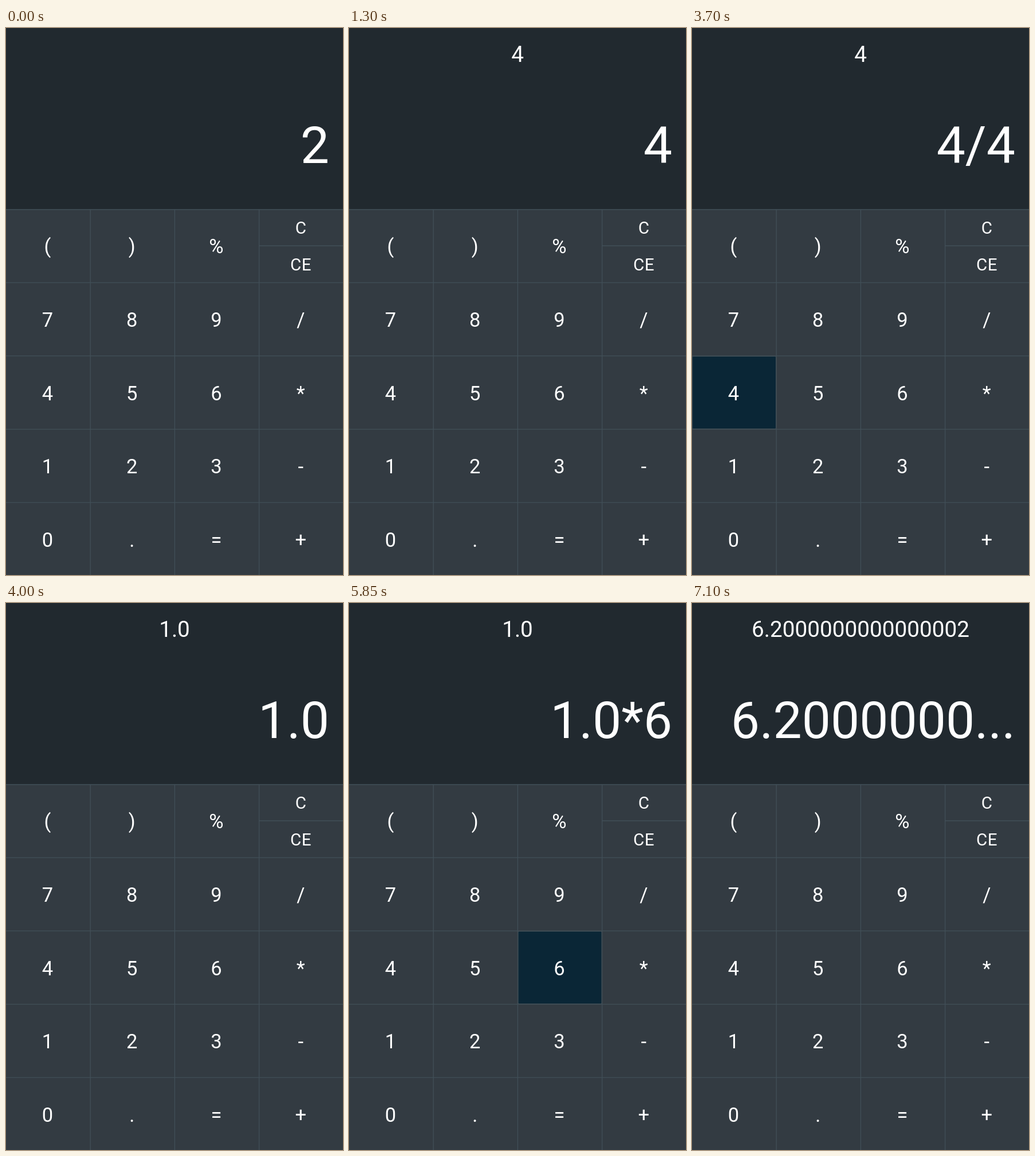
Write an HTML page that moves like this. It is 588 px wide and 952 px high and loops after 8 s.

```html
<!DOCTYPE html>
<html lang="en">
<head>
<meta charset="utf-8">
<title>Calculator</title>
<style>
  html, body { margin: 0; width: 100%; height: 100%; overflow: hidden; background: #21292f; }
  svg { display: block; width: 588px; height: 952px; }
  text { fill: #fff; font-family: Roboto, Arial, sans-serif; font-kerning: none; }
  .key { font-size: 34.5px; text-anchor: middle; }
  .small { font-size: 29.5px; letter-spacing: .5px; }
  #entry { font-size: 89.4px; text-anchor: end; }
  #result { font-size: 38.7px; text-anchor: middle; }
  #lines { stroke: #43525a; stroke-width: 1.3; fill: none; }
  #press { fill: #0a2636; stroke: #3d4a52; stroke-width: 1; }
</style>
</head>
<body>
<svg viewBox="0 0 588 952">
  <rect width="588" height="952" fill="#21292f"/>
  <rect y="315.5" width="588" height="636.5" fill="#333b42"/>
  <path id="lines" d="M0 316H588" stroke-opacity=".9"/>
  <rect id="press" rx="2"/>
  <g id="keys"></g>
  <text id="result" x="294" y="59"></text>
  <text id="entry" x="564" y="235"></text>
</svg>
<script>
const LOOP = 8000, COL = 147.2, ROW = 127.6, TOP = 315.5;
const $ = id => document.getElementById(id);
const rows = ["()%", "789/", "456*", "123-", "0.=+"];

// Each press: start, end, key, entry line, result line
const presses = [
  [0, 0, "", "2", ""],
  [100, 200, "*", "2*", ""],
  [400, 450, "2", "2*2", ""],
  [1200, 1300, "=", "4", "4"],
  [2400, 2500, "/", "4/", "4"],
  [3700, 3750, "4", "4/4", "4"],
  [3900, 4000, "=", "1.0", "1.0"],
  [5050, 5150, "*", "1.0*", "1.0"],
  [5850, 5950, "6", "1.0*6", "1.0"],
  [6550, 6650, ".", "1.0*6.", "1.0"],
  [6800, 6850, "2", "1.0*6.2", "1.0"],
  [7000, 7100, "=", "6.2000000...", "6.2000000000000002"]
];

function addLabel(label, x, y, cls) {
  const el = document.createElementNS("http://www.w3.org/2000/svg", "text");
  el.setAttribute("class", cls);
  el.setAttribute("x", x);
  el.setAttribute("y", y);
  el.textContent = label;
  $("keys").append(el);
}

const cells = {};
rows.forEach((row, r) => [...row].forEach((label, c) => {
  cells[label] = [c * COL, TOP + r * ROW];
  addLabel(label, 72.4 + c * 147.3, 392 + r * 127.75, "key");
}));
addLabel("C", 514.5, 357.5, "key small");
addLabel("CE", 514.5, 421.5, "key small");

let grid = "M0 316H588M441.5 379H588";
for (let i = 1; i < 5; i++) grid += `M0 ${TOP + i * ROW}H588`;
for (let i = 1; i < 4; i++) grid += `M${i * COL} ${TOP}V952`;
$("lines").setAttribute("d", grid);

let shown = "";
function draw() {
  const t = performance.now() % LOOP;
  const [, end, key, entry, result] = presses.findLast(p => t >= p[0]);
  const down = t < end;
  const state = entry + down;
  if (state !== shown) {
    shown = state;
    $("entry").textContent = entry;
    $("result").textContent = result;
    const press = $("press");
    press.style.display = down ? "" : "none";
    if (down) {
      const [x, y] = cells[key];
      const box = { x: x + .7, y: y + .7, width: COL - 1.4, height: ROW - 1.4 };
      for (const name in box) press.setAttribute(name, box[name]);
    }
  }
  requestAnimationFrame(draw);
}
draw();
</script>
</body>
</html>
```
